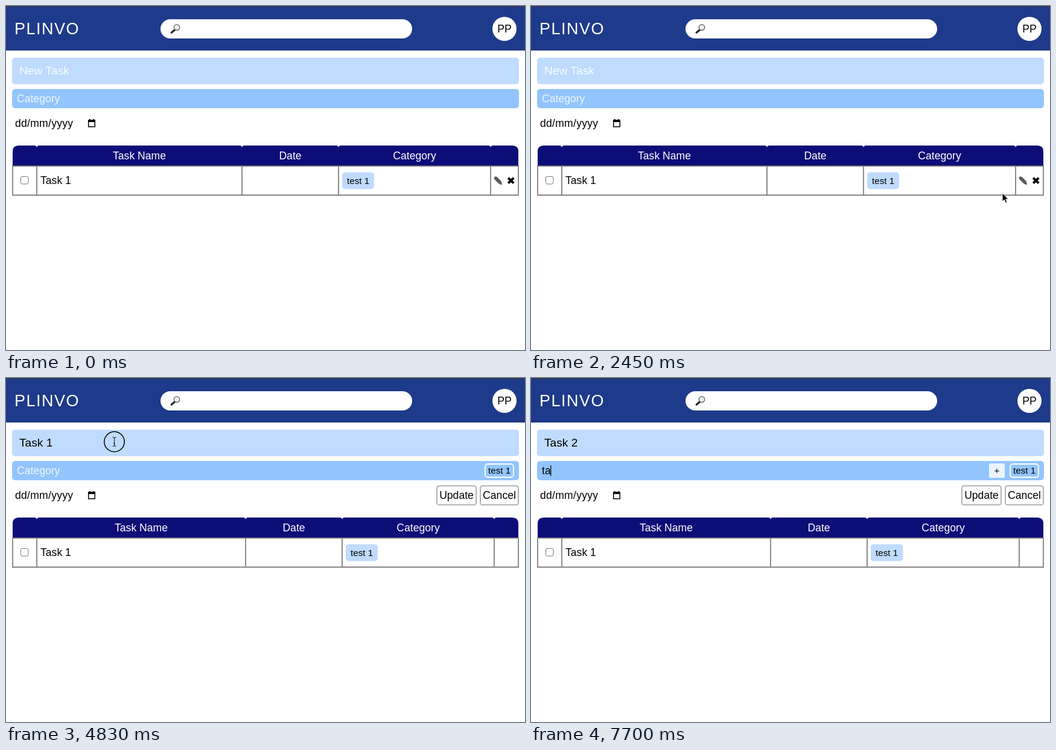
An HTML page that plays this animation: 860 px wide and 572 px high, repeating every 8 s.

```html
<!DOCTYPE html>
<html lang="en">
<head>
<meta charset="utf-8">
<title>Task list</title>
<style>
  html, body { margin: 0; width: 100%; height: 100%; overflow: hidden; background: #fff; }
  svg { display: block; width: 860px; height: 572px; }
  text { font-family: 'Liberation Sans', Arial, sans-serif; font-size: 17.6px; white-space: pre; }
  .mid { text-anchor: middle; }
  .small { font-size: 15.2px; }
  .big { font-size: 19.2px; }
  .white { fill: #fff; }
</style>
</head>
<body>
<svg id="stage" viewBox="0 0 860 572" xmlns="http://www.w3.org/2000/svg"></svg>
<script>
const LOOP = 8000, STEP = 70;
const stage = document.getElementById('stage');

const rect = (x, y, w, h, r, fill, more = '') =>
  `<rect x="${x}" y="${y}" width="${w}" height="${h}" rx="${r}" fill="${fill}" ${more}/>`;
const text = (x, y, str, cls = '', more = '') =>
  `<text x="${x}" y="${y}" class="${cls}" ${more}>${str}</text>`;

function headCell(x0, x1, rl, rr) {
  return `<path fill="#0d0d78" d="M${x0} 266V${232 + rl}Q${x0} 232 ${x0 + rl} 232` +
    `H${x1 - rr}Q${x1} 232 ${x1} ${232 + rr}V266Z"/>`;
}

function table(cols) {
  const last = cols.length - 1;
  let out = '';
  for (let i = 0; i < last; i++)
    out += headCell(cols[i], cols[i + 1], i ? 4 : 10, i === last - 1 ? 10 : 4);
  ['Task Name', 'Date', 'Category'].forEach((name, i) => {
    out += text((cols[i + 1] + cols[i + 2]) / 2, 255, name, 'mid white');
  });
  const inner = cols.slice(1, -1).map(x => `M${x} 266V314.5`).join('');
  out += `<path d="M11 266.2H849V314.5H11Z${inner}" fill="none" stroke="#7f7f7f" stroke-width="1.8"/>`;
  out += rect(24.5, 283.5, 12.5, 12.5, 2.5, '#fff', 'stroke="#767676"');
  out += text(57, 296, 'Task 1');
  out += rect(cols[3] + 6, 276.5, 53, 28, 5, '#bfdbfe');
  return out + text(cols[3] + 14, 296, 'test 1', 'small');
}

const button = (x, w, label) =>
  rect(x + 1, 179.3, w - 2, 31.6, 3.5, '#fff', 'stroke="#aaa" stroke-width="1.8"') +
  text(x + w / 2, 201, label, 'mid');

const page =
  rect(0, 0, 860, 74, 0, '#1e3a8a') + rect(0, 0, 860, 1.3, 0, '#3a3d48') +
  rect(0, 73, 860, 1, 0, '#1a3277') +
  text(14, 47, 'PLINVO', 'white', 'style="font-size:27px;letter-spacing:1.5px"') +
  rect(256, 22, 417, 32, 16, '#fff') +
  `<path d="M274.2 44.2L279.6 39.6" stroke="#222" stroke-width="3.2" stroke-linecap="round"/>
   <circle cx="283" cy="35.6" r="4.7" fill="#eef3f6" stroke="#555" stroke-width="1.3"/>
   <path d="M280.3 35.4Q280.8 33 283.2 32.8" fill="none" stroke="#fff"/>
   <circle cx="826" cy="38" r="20" fill="#fff"/>` +
  text(826, 43.5, 'PP', 'mid') +
  rect(10, 86, 840, 44, 5, '#bfdbfe') + rect(10, 138, 840, 32, 5, '#93c5fd') +
  text(15, 201, 'dd/mm/yyyy', '', 'style="letter-spacing:.25px"') +
  `<path d="M136.7 190.2H147.3V200.7H136.7Z" fill="none" stroke="#000" stroke-width="1.5"/>
   <path d="M136 189.5H148V193H136ZM138 188H139.7V190H138ZM144.3 188H146V190H144.3Z"/>`;

const viewMode = table([11, 51, 391, 551, 803, 849]) +
  `<path d="M809.8 284.2L813 284.4L820 291.6L821.4 296.6L816.6 295L809.6 287.6Z" fill="#777" stroke="#222" stroke-width=".9"/>
   <path d="M810.6 286.2L818 293.8M812 285L819.2 292.4" stroke="#222" stroke-width=".8"/>
   <path d="M832.2 285.8L841.2 294.6M841.2 285.8L832.2 294.6" stroke="#000" stroke-width="3.9"/>`;

const editMode = table([11, 51, 397, 557, 809, 849]) +
  rect(794, 143, 47, 22, 4.5, '#93c5fd', 'stroke="#fff" stroke-width="1.8"') +
  text(799, 159, 'test 1', 'small') +
  button(713, 67, 'Update') + button(785, 65, 'Cancel');

const arrow = '<path d="M0 0V14.2L3.3 11.2L5.6 16.4L8 15.4L5.8 10.3H10Z" fill="#000" stroke="#fff" stroke-width="1"/>';
const hand = `<path d="M-2.5 1.5C-2.5-.8 .7-.8 1.2 1L2.6 6.3C3.5 5 5.4 5.3 5.7 6.7C6.8 5.6 8.4 6.2 8.6 7.6
  C10 6.8 11.2 7.8 11 9.5C11 13 9.6 14 9.4 17H1.6C1 14.5-2.5 12.5-3.8 9.8C-4.4 8-2 7.3-.3 9.5Z"
  fill="#fff" stroke="#000" stroke-width="1.1"/><path d="M3.6 11V14.5M5.6 11V14.5M7.6 11V14.5" stroke="#000" stroke-width=".8"/>`;
const beam = `<path d="M-3-7.5Q0-7.5 0-5Q0-7.5 3-7.5M0-5.5V5.5M-3 7.5Q0 7.5 0 5Q0 7.5 3 7.5M-1.5 2.5H1.5"
  fill="none" stroke="#222" stroke-width="1.1"/>`;

stage.innerHTML = page +
  `<g id="view">${viewMode}</g><g id="edit">${editMode}</g>` +
  text(22, 114, '', 'big', 'id="task"') + text(18, 160, '', '', 'id="cat"') +
  `<g id="plus">${rect(759, 142, 26, 24, 2, '#eaf4ff')}${text(772, 159, '+', 'mid small')}</g>` +
  `<rect id="caret" width="1.2" fill="#000"/>
   <circle id="ring" fill="none" stroke="#000" stroke-width="1.5"/>
   <g id="mouse"><g id="arrow">${arrow}</g><g id="hand">${hand}</g><g id="beam">${beam}</g></g>`;

const el = {};
stage.querySelectorAll('[id]').forEach(n => { el[n.id] = n; });
const show = (node, on) => node.setAttribute('display', on ? 'inline' : 'none');
const set = (node, attrs) => { for (const k in attrs) node.setAttribute(k, attrs[k]); };

// time, x, y
const path = [
  [420, 680, 530], [840, 797, 311], [980, 797, 311], [1120, 798, 302], [1540, 820, 293],
  [1960, 820, 293], [2240, 500, 249], [2450, 781, 311], [2800, 815, 289], [2940, 807, 282.5],
  [3360, 807, 282.5], [3500, 813.5, 284], [4200, 813.5, 284], [4830, 179.5, 106],
  [6370, 179.5, 106], [7000, 142, 149.5]
];
// start, end, radius
const clicks = [[1680, 1820, 21], [3080, 3220, 21], [4830, 4900, 16.7], [4900, 4970, 21], [7000, 7140, 16.7]];
// start, end, x, top
const carets = [
  [4900, 5250, 77.4, 99], [5250, 5390, 67, 99], [5600, 6090, 77.4, 99],
  [7000, 7490, 18, 145], [7630, 7700, 23, 145], [7700, 8000, 32.2, 145]
];
const during = (list, t) => list.find(s => t >= s[0] && t < s[1]);

function mouseAt(t) {
  const i = path.findIndex(p => p[0] > t);
  if (i < 0) return path[path.length - 1].slice(1);
  if (i === 0) return path[0].slice(1);
  const [t0, x0, y0] = path[i - 1], [t1, x1, y1] = path[i];
  const u = (t - t0) / (t1 - t0);
  const e = i === 1 ? 1 - (1 - u) ** 2 : u * u * (3 - 2 * u);
  return [x0 + (x1 - x0) * e, y0 + (y1 - y0) * e];
}

function draw(ms) {
  const t = Math.floor(ms / STEP + 1e-6) * STEP;
  const editing = t >= 3920;
  show(el.view, !editing);
  show(el.edit, editing);

  el.task.textContent = !editing ? 'New Task' : t < 5250 ? 'Task 1' : t < 5600 ? 'Task ' : 'Task 2';
  el.task.setAttribute('fill', editing ? '#000' : '#f8fbff');
  const typed = t >= 7630;
  el.cat.textContent = !typed ? 'Category' : t < 7700 ? 't' : 'ta';
  el.cat.setAttribute('fill', typed ? '#000' : '#eff6ff');
  show(el.plus, typed);

  const caret = during(carets, t);
  show(el.caret, caret);
  if (caret) set(el.caret, { x: caret[2], y: caret[3], height: 18 });

  const [x, y] = mouseAt(t);
  const click = during(clicks, t);
  show(el.ring, click);
  if (click) set(el.ring, { cx: x, cy: y, r: click[2] });

  const kind = t >= 3430 && t < 4270 ? 'hand' : t >= 4270 && y < 170 ? 'beam' : 'arrow';
  ['arrow', 'hand', 'beam'].forEach(k => show(el[k], k === kind));
  show(el.mouse, t >= 420 && !(t >= 5250 && t < 6440) && !typed);
  el.mouse.setAttribute('transform', `translate(${x.toFixed(2)} ${y.toFixed(2)})`);
}

const start = performance.now();
function tick() {
  draw((performance.now() - start) % LOOP);
  requestAnimationFrame(tick);
}
tick();
</script>
</body>
</html>
```
